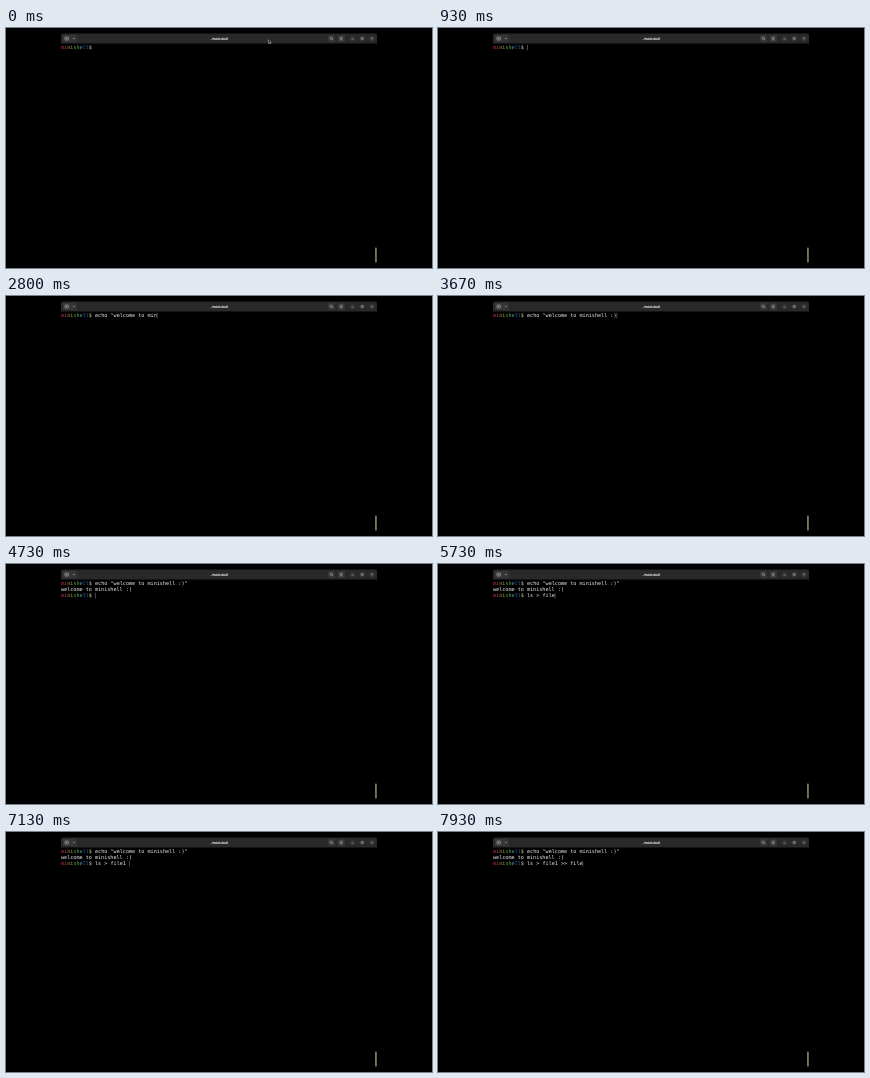
Animation, 426 px wide and 240 px high, one loop 8000 ms. Source, as an HTML page:

```html
<!DOCTYPE html>
<html lang="en">
<head>
<meta charset="utf-8">
<title>Terminal session</title>
<style>
  html, body { margin: 0; width: 100%; height: 100%; overflow: hidden; background: #000; }
  svg { display: block; width: 100%; height: 100%; }
  text { white-space: pre; text-rendering: geometricPrecision; }
  .term { font: 5.13px "DejaVu Sans Mono", monospace; fill: #f0f0f0; }
  .title { font: bold 3.3px "Open Sans", "Noto Sans", sans-serif; fill: #fff; text-anchor: middle; }
  .button { fill: #363636; }
  .icon { fill: none; stroke: #aaa; stroke-width: .6; }
  .pointer { fill: #111; stroke: #ccc; stroke-width: .5; animation: leave 8s step-end infinite; }
  @keyframes leave { 0% { opacity: 1; } 6.6%, 100% { opacity: 0; } }
</style>
</head>
<body>
<svg viewBox="0 0 426 240">
  <path fill="#292929" d="M55 15.6V7q0-1.5 1.5-1.5h313q1.5 0 1.5 1.5v8.6z"/>
  <g class="button">
    <rect x="56.8" y="7" width="14" height="7" rx="1"/>
    <rect x="322" y="7" width="7.2" height="7" rx="1"/>
    <rect x="331.6" y="7" width="7.2" height="7" rx="1"/>
    <circle cx="346.5" cy="10.5" r="2.6"/>
    <circle cx="356.2" cy="10.5" r="2.6"/>
    <circle cx="365.9" cy="10.5" r="2.6"/>
  </g>
  <g class="icon">
    <path d="M59 9h3.4v3H59zM60.7 9.6v1.8M59.8 10.5h1.8M67 10l1 1 1-1"/>
    <circle cx="325.2" cy="10.2" r="1.2"/>
    <path d="M326.1 11.1l1 1M333.7 9.2h3M333.7 10.5h3M333.7 11.8h3"/>
    <path d="M345.5 11.2h2M355.3 9.6h1.8v1.8h-1.8zM365 9.6l1.8 1.8M366.8 9.6l-1.8 1.8"/>
  </g>
  <text class="title" x="213.3" y="11.7">./minishell</text>
  <path class="pointer" d="M262.3 11.8v3.7l1-.8.8 1.3.6-.4-.7-1.2 1.2-.2z"/>
  <g class="term">
    <text id="first" x="55" y="21.3"></text>
    <text id="reply" x="55" y="27.3"></text>
    <text id="second" x="55" y="33.3"></text>
  </g>
  <rect id="caret" width=".6" height="5.6" fill="#777"/>
  <rect x="369.3" y="219.6" width="1.3" height="14.8" rx=".4" fill="#aaa88c"/>
</svg>
<script>
const LOOP = 8000, ENTER = 4200, CHAR = 5.13 * 0.602, PROMPT = "minishell$ ";
const COLORS = ["#c8285a", "#b03890", "#b09a30", "#a0b040", "#48b050",
                "#48b050", "#40a888", "#4868d0", "#4868d0", "#d8d8a8"];
const el = id => document.getElementById(id);
const caret = el("caret");

// Each burst types its text at a steady pace from its start time.
const echo = [{ start: 840, pace: 97, text: 'echo "welcome to minishell :)' },
              { start: 3730, pace: 90, text: '"' }];
const list = [{ start: 4820, pace: 98, text: "ls > file1 " },
              { start: 7200, pace: 100, text: ">> file" }];

function typed(bursts, time) {
  return bursts.map(({ start, pace, text }) =>
    text.slice(0, Math.max(0, Math.floor((time - start) / pace)))).join("");
}

function addSpan(line, text, fill) {
  const span = document.createElementNS("http://www.w3.org/2000/svg", "tspan");
  span.textContent = text;
  if (fill) span.setAttribute("fill", fill);
  line.append(span);
  return span;
}

function addPrompt(line) {
  [...PROMPT].forEach((char, i) => addSpan(line, char, COLORS[i]));
  return addSpan(line, "");
}

const firstCommand = addPrompt(el("first"));
const secondCommand = addPrompt(el("second"));

function draw() {
  const time = performance.now() % LOOP;
  const entered = time >= ENTER;
  const first = typed(echo, time), second = typed(list, time);
  firstCommand.textContent = first;
  secondCommand.textContent = second;
  el("reply").textContent = entered ? "welcome to minishell :)" : "";
  el("second").setAttribute("visibility", entered ? "visible" : "hidden");
  const active = entered ? second : first;
  caret.setAttribute("x", 55 + (PROMPT.length + active.length) * CHAR);
  caret.setAttribute("y", entered ? 28.8 : 16.8);
  caret.setAttribute("visibility", time < 600 ? "hidden" : "visible");
  requestAnimationFrame(draw);
}
draw();
</script>
</body>
</html>
```
